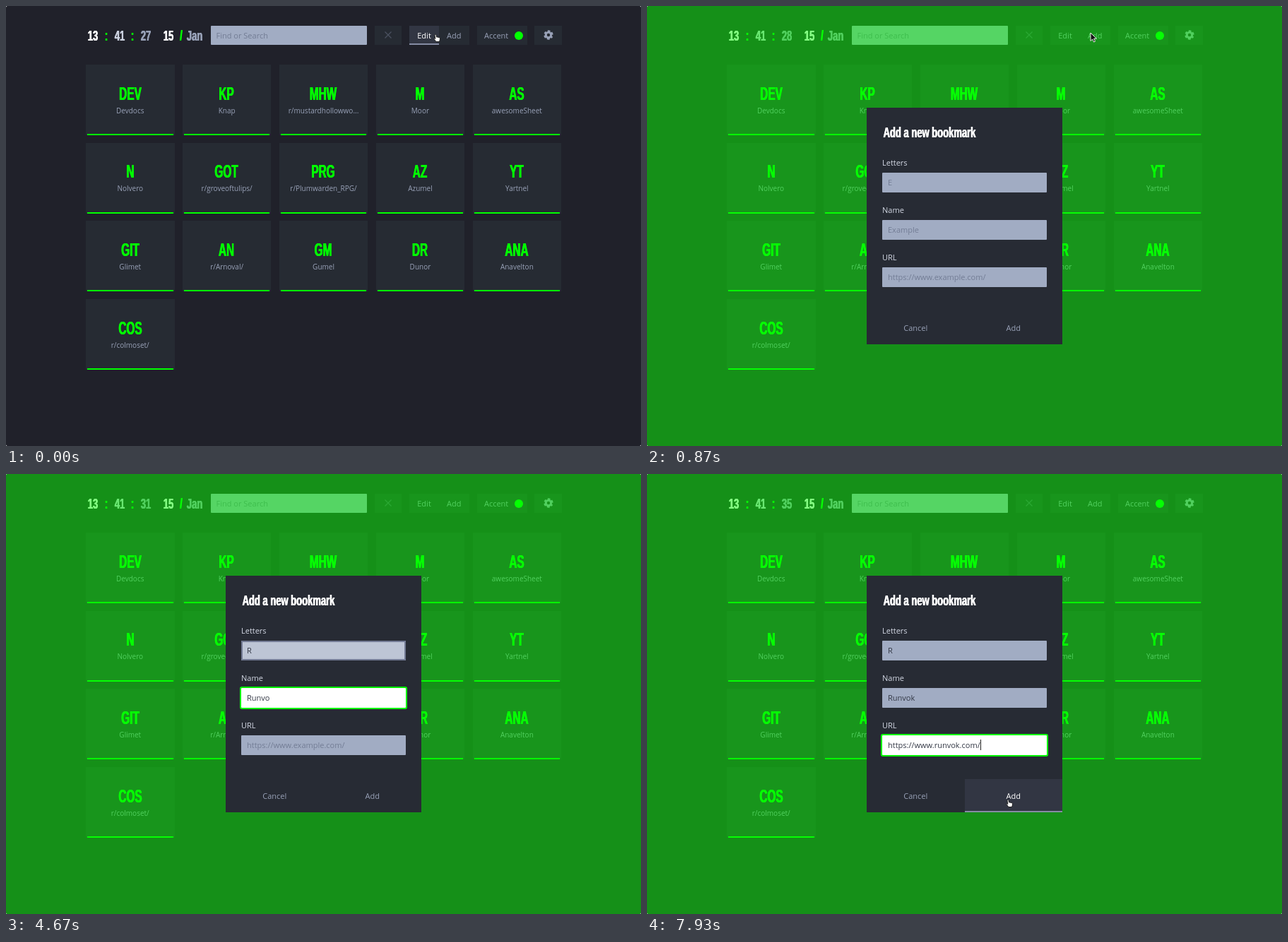
Animation of 899 by 623 pixels, one loop 8 s. Source, as an HTML page:

```html
<!DOCTYPE html>
<html lang="en">
<head>
<meta charset="utf-8">
<title>Bookmarks</title>
<style>
  :root { --accent: #00ff00; --panel: #262b33; --text: #98a1b7; }
  html, body { margin: 0; width: 100%; height: 100%; overflow: hidden; }
  html { background: #fff; }
  body { position: relative; border-radius: 2px; background: #20212a; font: 11px/15px "Open Sans", sans-serif; color: var(--text); }
  body div, body b, .label, .name { position: absolute; white-space: pre; }
  #clock, #cards, #form { left: 0; top: 0; }

  /* condensed heading face */
  b {
    font: bold 21px/1 "Liberation Sans", Arial, sans-serif;
    transform: translate(-50%, -50%) scaleX(.62);
    text-shadow: .6px 0 0 currentColor, -.6px 0 0 currentColor;
  }
  .green { color: var(--accent); }
  .white { color: #fff; }
  .pale { color: #cbd1df; }

  .card { width: 125.5px; height: 100px; background: var(--panel); }
  .card::after {
    content: ""; position: absolute; left: 2px; right: 2px; bottom: 0;
    height: 2px; background: var(--accent);
  }
  .card b { left: 62.5px; top: 40.7px; font-size: 26.5px; transform: translate(-50%, -50%) scaleX(.58); color: var(--accent); }
  .name { left: 0; right: 0; top: 57.5px; text-align: center; font-size: 10px; }

  .btn { top: 27.5px; height: 27.5px; line-height: 28px; background: var(--panel); text-align: center; }
  .btn svg { position: absolute; left: 50%; top: 50%; transform: translate(-50%, -50%); }
  .on { background: #323643; color: #fff; box-shadow: inset 0 -2px #858ca4; }
  .press { box-shadow: inset 0 -2px var(--accent); }
  .dot { left: 53px; top: 8px; width: 12px; height: 12px; border-radius: 50%; background: var(--accent); }
  .search { left: 290px; top: 27.5px; width: 220.5px; height: 27.5px; line-height: 28px; text-indent: 7.5px; background: #a1acc3; color: #727c94; border-radius: 1px; }

  #shade { inset: 0; background: rgba(10, 255, 6, .5); animation: show 8s linear infinite; }
  #modal { left: 311px; top: 143.5px; width: 277px; height: 335.5px; background: #272b34; animation: show 8s linear infinite; }
  @keyframes show { 0%, 8.7% { opacity: 0 } 10.7%, 100% { opacity: 1 } }

  .label { left: 22px; color: #d3d8e4; }
  .field {
    left: 22px; width: 233px; height: 27.5px; line-height: 28px; box-sizing: border-box;
    padding-left: 8px; background: #a1acc3; color: #343946; border-radius: 1px;
  }
  .field i { display: inline-block; width: 1px; height: 15px; margin-right: -1px; vertical-align: -3px; background: #222; visibility: hidden; }
  .field s { text-decoration: none; color: #737d95; }
  .field.hover { background: #bdc5d5; box-shadow: inset 0 0 0 2px #737b95; }
  .field.focus { background: #fff; box-shadow: 0 0 0 2px var(--accent); }
  .field.focus s { color: #9aa0ad; }
  .field.caret i { visibility: visible; }
  .act { top: 288px; width: 138.5px; height: 47.5px; line-height: 48px; text-align: center; }

  #cursor { left: 0; top: 0; width: 0; height: 0; animation: move 8s ease-in-out infinite; }
  #cursor svg { position: absolute; left: -8px; top: -8px; visibility: hidden; }
  #cursor.hand .hand, #cursor.arrow .arrow, #cursor.beam .beam { visibility: visible; }
  @keyframes move {
    0%, .9% { transform: translate(608px, 40px) }
    4%, 11.6% { transform: translate(628px, 38px) }
    21.5%, 89% { transform: translate(409px, 248px) }
    98.2%, 100% { transform: translate(511px, 461px) }
  }
</style>
</head>
<body>
<div id="clock"></div>
<div class="search">Find or Search</div>
<div class="btn" style="left:521.5px;width:38.5px">
  <svg width="11" height="11" stroke="#4b5160" stroke-width="1.2"><path d="M1 1 10 10M10 1 1 10"/></svg>
</div>
<div class="btn" id="edit" style="left:571px;width:42px">Edit</div>
<div class="btn" id="add" style="left:613px;width:42.5px">Add</div>
<div class="btn" style="left:667px;width:71px;text-align:left;text-indent:10px">Accent<div class="dot"></div></div>
<div class="btn" style="left:748px;width:39px">
  <svg width="16" height="16" fill="none" stroke="#98a1b7">
    <circle cx="8" cy="8" r="3.7" stroke-width="3"/>
    <circle cx="8" cy="8" r="5.5" stroke-width="2.4" stroke-dasharray="3.4 2.36" stroke-dashoffset="1.7" transform="rotate(30 8 8)"/>
  </svg>
</div>
<div id="cards"></div>
<div id="shade"></div>
<div id="modal">
  <b class="white" style="left:89px;top:34.3px">Add a new bookmark</b>
  <div id="form"></div>
  <div class="act" style="left:0">Cancel</div>
  <div class="act" id="save" style="left:138.5px">Add</div>
</div>
<div id="cursor">
  <svg class="arrow" width="28" height="30"><path d="M8 8v11.5l2.7-2.5 1.8 4 2-.9-1.8-3.9h3.7z" fill="#111" stroke="#fff" stroke-width=".9"/></svg>
  <svg class="hand" width="28" height="30"><path d="M7.3 8.6c.9-.6 1.7.1 1.8.9l.4 2.6c.6-.5 1.4-.3 1.7.3.6-.4 1.4-.2 1.6.4.9-.3 1.7.2 1.7 1.1 0 2-.4 3-1.1 4.6H8.9c-.8-1.6-2.3-2.7-2.9-4.1-.2-.8.7-1.1 1.900.1L7 9.5z" fill="#fff" stroke="#111" stroke-width=".9"/></svg>
  <svg class="beam" width="28" height="30" fill="none"><path d="M5.5 2.5q2.5 0 2.5 1.5 0-1.5 2.5-1.5M8 4v8M6.5 8h3M5.5 13.5q2.5 0 2.5-1.5 0 1.5 2.5 1.5" stroke="#111" stroke-width="1.2"/></svg>
</div>
<script>
const LOOP = 8000;
const $ = id => document.getElementById(id);

$('clock').innerHTML = [
  ['13', 122.5, 'white'], [':', 141.5, 'green'], ['41', 160.5, 'pale'], [':', 179, 'green'], ['27', 197.5, 'sec'],
  ['15', 229.5, 'white'], ['/', 248, 'green'], ['Jan', 267, '']
].map(([text, x, cls]) => `<b class="${cls}" style="left:${x}px;top:41px">${text}</b>`).join('');
const sec = document.querySelector('.sec');

$('cards').innerHTML = [
  'DEV Devdocs', 'KP Knap', 'MHW r/mustardhollowwo...', 'M Moor', 'AS awesomeSheet',
  'N Nolvero', 'GOT r/groveoftulips/', 'PRG r/Plumwarden_RPG/', 'AZ Azumel', 'YT Yartnel',
  'GIT Glimet', 'AN r/Arnoval/', 'GM Gumel', 'DR Dunor', 'ANA Anavelton', 'COS r/colmoset/'
].map((item, i) => {
  const [letters, name] = item.split(' ');
  const x = 113 + i % 5 * 136.9, y = 83 + Math.floor(i / 5) * 110.7;
  return `<div class="card" style="left:${x}px;top:${y}px"><b>${letters}</b><span class="name">${name}</span></div>`;
}).join('');

// typed: [time, number of characters]; caret: spans of time in which it shows
const fields = [
  { label: 'Letters', hint: 'E', value: 'R', focus: [1800, 3730],
    typed: [[2870, 1]], caret: [[1800, 2300], [2800, 3370]] },
  { label: 'Name', hint: 'Example', value: 'Runvok', focus: [3730, 6100],
    typed: [[4070, 1], [4200, 2], [4330, 3], [4400, 4], [4530, 5], [5000, 6]], caret: [[3730, 4600], [5000, 5500]] },
  { label: 'URL', hint: 'https://www.example.com/', value: 'https://www.runvok.com/', focus: [6100, LOOP],
    typed: [[7450, 23]], caret: [[6100, 6600], [7070, LOOP]] }
];
$('form').innerHTML = fields.map((f, i) => `<span class="label" style="top:${70.7 + i * 67.1}px">${f.label}</span>` +
  `<div class="field" style="top:${92.5 + i * 67.1}px"><span></span><i></i><s></s></div>`).join('');
document.querySelectorAll('.field').forEach((el, i) => fields[i].el = el);

const within = (t, [from, to]) => t >= from && t < to;
const last = (t, steps, start) => steps.reduce((v, [at, next]) => t >= at ? next : v, start);
const toggle = (el, cls, on) => el.classList.toggle(cls, on);
const pointer = [[695, 'arrow'], [1620, 'beam'], [2870, ''], [7120, 'beam'], [7330, 'arrow'], [7390, 'beam'],
  [7480, 'arrow'], [7530, 'beam'], [7620, 'arrow'], [7700, 'hand']];

function draw(t) {
  sec.textContent = 27 + Math.floor((t + 200) / 1000);
  toggle($('edit'), 'on', t < 170);
  toggle($('add'), 'on', within(t, [170, 800]));
  toggle($('add'), 'press', within(t, [560, 800]));
  toggle($('save'), 'on', t >= 7700);
  $('cursor').className = last(t, pointer, 'hand');

  fields.forEach((f, i) => {
    const text = f.value.slice(0, last(t, f.typed, 0));
    f.el.firstChild.textContent = text;
    f.el.lastChild.textContent = text ? '' : f.hint;
    toggle(f.el, 'focus', within(t, f.focus));
    toggle(f.el, 'caret', f.caret.some(span => within(t, span)));
    toggle(f.el, 'hover', i === 0 && within(t, [1620, 7330]));
  });
}

let start;
function tick(now) {
  start ??= now;
  draw((now - start) % LOOP);
  requestAnimationFrame(tick);
}
draw(0);
requestAnimationFrame(tick);
</script>
</body>
</html>
```
